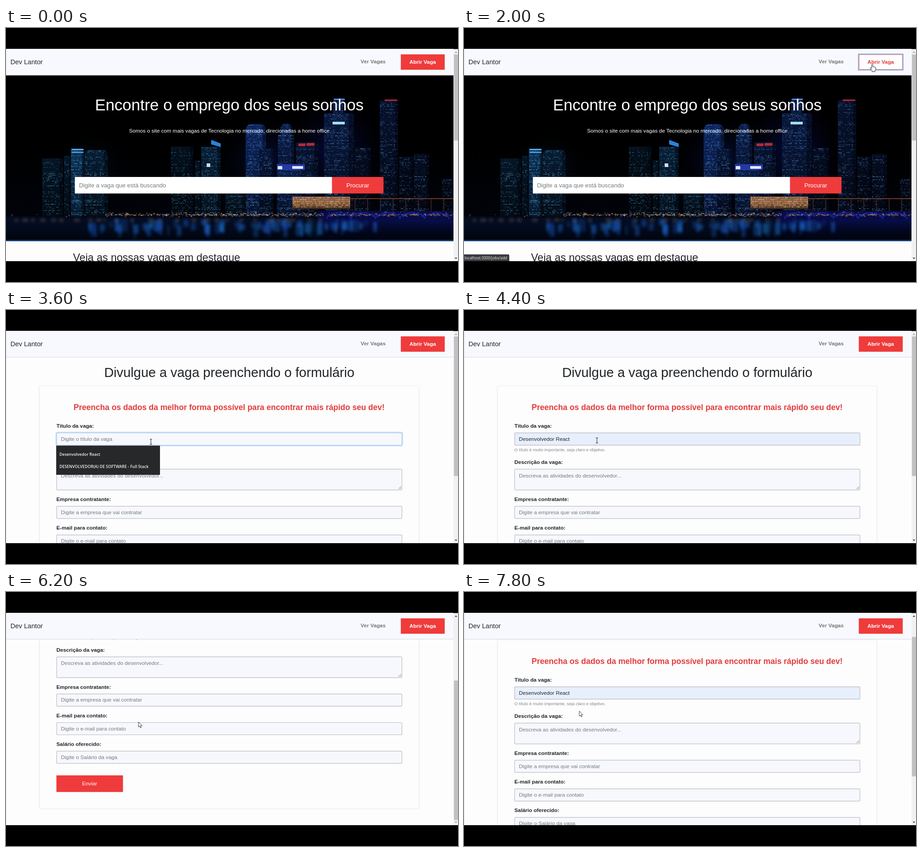
Recreate the animation shown at these times as an HTML page with a canvas. Size 998x561 px, loop 8000 ms.

```html
<!DOCTYPE html>
<html lang="pt-BR">
<head>
<meta charset="utf-8">
<title>Vagas</title>
<style>
  @property --scroll { syntax: "<number>"; inherits: true; initial-value: 0; }
  html, body { margin: 0; width: 100%; height: 100%; overflow: hidden; background: #000; }
  canvas, svg { position: absolute; left: 0; top: 0; }
  canvas { top: 104px; }
  svg { font: 11.73px "Liberation Sans", Arial, sans-serif; fill: #212529; }

  .brand { font-size: 14.61px; }
  .h1 { font-size: 35.22px; }
  .h2 { font-size: 29.34px; }
  .h3 { font-size: 23.46px; }
  .lead { font-size: 17.58px; fill: #e23d3d; }
  .big { font-size: 13.2px; }
  .small { font-size: 9.38px; fill: #80868c; }
  .bold { font-weight: 700; }
  .mid { text-anchor: middle; }
  .hint { fill: #757a80; }
  .white { fill: #fff; }
  .red { fill: #ef3b3b; }
  .ui { font-family: "Open Sans", "Noto Sans", sans-serif; font-size: 8.4px; fill: #f2f2f2; }
  .menu { font-size: 8.9px; font-weight: 600; }
  .box { fill: #f7f8fd; stroke: #c3c5cb; stroke-width: 1.4; }
  .halo { fill: none; stroke: #bfd9f8; stroke-width: 3; }

  .anim { animation: 8s step-end infinite; }
  .home { animation-name: home; }
  .form { animation-name: form; }
  .hover { animation-name: hover; }
  .status { animation-name: status; }
  .ring { animation-name: ring; }
  .focus { animation-name: focus; }
  .drop { animation-name: drop; }
  .pick { animation-name: pick; }
  .filled { animation-name: filled; }
  .hand { animation-name: hover; }
  .beam { animation-name: beam; }
  .arrow { animation-name: arrow; }
  .up { animation-name: up; }
  .down { animation-name: down; }
  .cursor { animation-name: cursor; }
  .stage { animation-name: scroll; }
  .page { transform: translateY(calc(var(--scroll) * -1px)); }
  .thumb { transform: translateY(calc(var(--scroll) * .6577px)); }

  @keyframes home { 0% { opacity: 1 } 27.5% { opacity: 0 } }
  @keyframes form { 0% { opacity: 0 } 27.5% { opacity: 1 } }
  @keyframes hover { 0%, 32.5% { opacity: 0 } 12.5% { opacity: 1 } }
  @keyframes status { 0%, 32.5% { opacity: 0 } 15% { opacity: 1 } }
  @keyframes ring { 0%, 27.5% { opacity: 0 } 22.5% { opacity: 1 } }
  @keyframes focus { 0%, 55% { opacity: 0 } 42.5% { opacity: 1 } }
  @keyframes drop { 0%, 52.5% { opacity: 0 } 45% { opacity: 1 } }
  @keyframes pick { 0%, 52.5% { opacity: 0 } 50% { opacity: 1 } }
  @keyframes filled { 0% { opacity: 0 } 50% { opacity: 1 } }
  @keyframes beam {
    0%, 47.5%, 62.5%, 77.5% { opacity: 0 }
    40%, 52.5%, 70% { opacity: 1 }
  }
  @keyframes arrow {
    0%, 12.5%, 40%, 52.5%, 70% { opacity: 0 }
    2.5%, 32.5%, 47.5%, 62.5%, 77.5% { opacity: 1 }
  }
  @keyframes up {
    0%, 70% { fill: #a8a8a8 }
    62.5%, 77.5% { fill: #505050 }
  }
  @keyframes down {
    0%, 67.5%, 85% { fill: #505050 }
    65%, 77.5% { fill: #a8a8a8 }
  }
  @keyframes scroll {
    0%, 70% { --scroll: 0 }
    62.5% { --scroll: 104 }
    65%, 77.5% { --scroll: 208.3 }
    67.5% { --scroll: 90 }
    85% { --scroll: 172 }
    87.5% { --scroll: 135 }
    90% { --scroll: 98 }
    92.5% { --scroll: 62 }
  }
  @keyframes cursor {
    0% { transform: translate(985px, 330px) }
    5% { transform: translate(962px, 265px) }
    7.5% { transform: translate(938px, 195px) }
    10% { transform: translate(916px, 130px) }
    12.5% { transform: translate(905px, 88px) }
    15% { transform: translate(903px, 83px) }
    17.5% { transform: translate(902px, 81px) }
    20% { transform: translate(901.5px, 80px) }
    27.5% { transform: translate(901px, 80.5px) }
    30% { transform: translate(895px, 87px) }
    32.5% { transform: translate(800px, 130px) }
    35% { transform: translate(650px, 190px) }
    37.5% { transform: translate(500px, 245px) }
    40% { transform: translate(390px, 281px) }
    42.5% { transform: translate(335px, 289px) }
    45% { transform: translate(320px, 291px) }
    47.5% { transform: translate(308px, 306px) }
    50% { transform: translate(296px, 318px) }
    52.5% { transform: translate(294px, 297px) }
    55% { transform: translate(293.5px, 288px) }
    77.5% { transform: translate(292.5px, 287px) }
    87.5% { transform: translate(286px, 283px) }
    90% { transform: translate(277px, 277px) }
    92.5% { transform: translate(268px, 271px) }
    95% { transform: translate(260px, 266px) }
    97.5% { transform: translate(254.5px, 263px) }
  }
</style>
</head>
<body>
<canvas class="anim home" width="988" height="367"></canvas>
<svg class="anim stage" width="998" height="561" viewBox="0 0 998 561">
  <defs>
    <clipPath id="view"><rect y="46.4" width="998" height="468.6"/></clipPath>
    <filter id="soft" x="-5%" y="-5%" width="110%" height="110%"><feGaussianBlur stdDeviation="1.6"/></filter>
  </defs>
  <g clip-path="url(#view)">

    <g class="anim home">
      <rect y="471" width="988" height="45" fill="#fdfdfe"/>
      <text class="h1 mid white" x="493" y="182.3">Encontre o emprego dos seus sonhos</text>
      <text class="mid white" x="493" y="231.3">Somos o site com mais vagas de Tecnologia no mercado, direcionadas a home office</text>
      <rect class="white" x="152" y="329" width="568" height="36.5"/>
      <text class="big hint" x="161.3" y="351.7">Digite a vaga que está buscando</text>
      <rect class="red" x="719.7" y="329" width="113.8" height="36.5"/>
      <text class="big mid white" x="776.7" y="351.7">Procurar</text>
      <text class="h3" x="148" y="515.3">Veja as nossas vagas em destaque</text>
    </g>

    <g class="anim form">
      <rect y="46" width="988" height="470" fill="#fdfdfd"/>
      <rect y="46" width="1" height="470" fill="#e6e6ef"/>
      <g class="page">
        <text class="h2 mid" x="493" y="148">Divulgue a vaga preenchendo o formulário</text>
        <rect x="74" y="168.5" width="838" height="518.5" rx="2" fill="#dcdde4" filter="url(#soft)"/>
        <rect x="74.5" y="168.5" width="837" height="518" rx="2" fill="#fdfdfd"/>
        <text class="lead bold mid" x="492.6" y="221.2">Preencha os dados da melhor forma possível para encontrar mais rápido seu dev!</text>

        <text class="bold" x="111.5" y="260">Titulo da vaga:</text>
        <rect class="box" x="111.8" y="271.5" width="762.4" height="27" rx="2"/>
        <text class="hint" x="121.3" y="288.8">Digite o título da vaga</text>
        <g class="anim filled">
          <rect class="box" x="111.8" y="271.5" width="762.4" height="27" rx="2" style="fill:#e7effd"/>
          <text x="121.3" y="288.8">Desenvolvedor React</text>
        </g>
        <rect class="halo anim focus" x="111" y="270.5" width="764" height="29" rx="3"/>
        <text class="small" x="111.3" y="312">O título é muito importante, seja claro e objetivo.</text>

        <text class="bold" x="111.3" y="340">Descrição da vaga:</text>
        <rect class="box" x="111.8" y="351.5" width="762.4" height="46" rx="2"/>
        <path d="M866.5 395.5l6-6M870 395.5l2.5-2.5" fill="none" stroke="#777"/>
        <text class="hint" x="121.3" y="369.5">Descreva as atividades do desenvolvedor...</text>

        <text class="bold" x="111.3" y="422">Empresa contratante:</text>
        <rect class="box" x="111.8" y="433.5" width="762.4" height="27" rx="2"/>
        <text class="hint" x="121.3" y="450.8">Digite a empresa que vai contratar</text>

        <text class="bold" x="111.3" y="485">E-mail para contato:</text>
        <rect class="box" x="111.8" y="496.7" width="762.4" height="27" rx="2"/>
        <text class="hint" x="121.3" y="514">Digite o e-mail para contato</text>

        <text class="bold" x="111.3" y="548.3">Salário oferecido:</text>
        <rect class="box" x="111.8" y="559.8" width="762.4" height="27" rx="2"/>
        <text class="hint" x="121.3" y="577">Digite o Salário da vaga</text>

        <rect class="red" x="111.3" y="613.3" width="147" height="36.7"/>
        <text class="mid white" x="184.6" y="635.6">Enviar</text>
      </g>
      <g class="anim drop">
        <rect x="110.8" y="299.5" width="229.2" height="64.5" rx="1" fill="#27282a"/>
        <rect class="anim pick" x="111" y="306" width="229" height="26" fill="#424447"/>
        <text class="ui menu" x="118" y="322">Desenvolvedor React</text>
        <text class="ui menu" x="118" y="348.7">DESENVOLVEDOR(A) DE SOFTWARE - Full Stack</text>
      </g>
    </g>

    <rect y="46" width="988" height="58.6" fill="#f8f9fe"/>
    <rect y="46" width="1" height="58" fill="#e2e2ec"/>
    <rect class="anim form" y="103.7" width="988" height="1" fill="#d5d6e2"/>
    <text class="brand" x="9.7" y="80.2">Dev Lantor</text>
    <text class="bold" x="783" y="78.2" style="fill:#777">Ver Vagas</text>
    <rect class="red" x="871.7" y="58.2" width="97" height="34"/>
    <text class="bold mid white" x="920" y="78.8">Abrir Vaga</text>
    <g class="anim hover">
      <rect class="anim ring" x="869.7" y="56.2" width="101" height="38" rx="1" fill="#9cc3f3"/>
      <rect x="872.2" y="58.7" width="96" height="33" fill="#fdfdfe" stroke="#d9534f"/>
      <text class="bold mid" x="920" y="78.8" style="fill:#e23d3d">Abrir Vaga</text>
    </g>

    <rect x="988" y="46" width="10" height="470" fill="#f1f1f4"/>
    <rect class="anim home" x="989" y="58.5" width="9" height="190" fill="#c1c1c3"/>
    <g class="anim form"><rect class="thumb" x="989" y="58.5" width="9" height="308" fill="#c1c1c3"/></g>
    <path class="anim up" d="M990.5 55l3-3.5 3 3.5z"/>
    <path class="anim down" d="M990.5 507l3 3.5 3-3.5z"/>

    <g class="anim status">
      <path d="M0 500h97q3 0 3 3v13H0z" fill="#3a3b3e"/>
      <text class="ui" x="1.3" y="510.8">localhost:3000/jobs/add</text>
    </g>

    <g class="anim cursor" stroke-linejoin="round">
      <path class="anim arrow" d="M0 0v11.2l2.6-2.4 1.8 4.2 1.8-.8-1.8-4H8z" fill="#fff" stroke="#222" stroke-width=".9"/>
      <path class="anim beam" d="M-2.5-6Q0-6 0-4.5Q0-6 2.5-6M0-5V5M-2.5 6Q0 6 0 4.5Q0 6 2.5 6" fill="none" stroke="#222" stroke-width="1.1"/>
      <path class="anim hand" d="M-1.4 1q1.4-2 2.8 0v5q1.3-1 2.4.3 1.4-.7 2.2.5 1.6-.4 1.6 1.4v3.2l-1.6 3v2h-6.4v-2l-4-5.4q-.2-2 1.7-1.4l1.3 1.5z" fill="#fff" stroke="#222" stroke-width="1"/>
    </g>
  </g>
</svg>
<script>
const ctx = document.querySelector("canvas").getContext("2d");
let seed = 77;
const rnd = () => (seed = seed * 16807 % 2147483647) / 2147483647;
const between = (a, b) => a + rnd() * (b - a);
const box = (color, x, y, w, h) => { ctx.fillStyle = color; ctx.fillRect(x, y, w, h); };
const fade = (y0, y1, ...colors) => {
  const g = ctx.createLinearGradient(0, y0, 0, y1);
  colors.forEach((c, i) => g.addColorStop(i / (colors.length - 1), c));
  return g;
};
const glow = (x, y, r, color) => {
  const g = ctx.createRadialGradient(x, y, 0, x, y, r);
  g.addColorStop(0, color);
  g.addColorStop(1, "transparent");
  box(g, x - r, y - r, 2 * r, 2 * r);
};

ctx.translate(0, -104);
box(fade(104, 420, "#000", "#000", "#01030a"), 0, 104, 988, 367);
glow(570, 290, 110, "rgba(8,30,120,.45)");
glow(725, 270, 130, "rgba(10,20,130,.5)");
glow(185, 310, 90, "rgba(6,30,70,.4)");

// left, top, width, brightness, roof radius
const towers = [
  [80, 288, 46, .35, 0], [128, 282, 14, .35, 0], [143, 266, 29, .8, 0], [173, 269, 52, .45, 12],
  [364, 262, 50, .25, 0], [417, 292, 13, .3, 0], [431, 262, 43, .5, 0],
  [606, 211, 26, .7, 12], [600, 235, 36, .6, 4], [640, 252, 49, .45, 4], [529, 212, 45, .85, 14],
  [559, 266, 32, .5, 3], [598, 300, 64, .7, 0], [722, 156, 26, .6, 0], [702, 188, 66, .55, 5],
  [769, 264, 36, .3, 0], [825, 160, 41, .4, 0], [868, 284, 30, .25, 0], [900, 278, 34, .3, 0],
  [962, 333, 26, .2, 0], [484, 366, 46, .35, 0]
];
for (const [x, y, w, lit, round] of towers) {
  const hue = x > 500 ? 222 : 210;
  ctx.save();
  ctx.beginPath();
  ctx.roundRect(x, y, w, 416 - y, [round, round, 0, 0]);
  ctx.clip();
  box(fade(y, 416, `hsl(${hue},75%,${lit * 24}%)`, `hsl(${hue},75%,${lit * 12}%)`), x, y, w, 416 - y);
  for (let fy = y + 2; fy < 413; fy += 3.4) {
    const floor = rnd() * .6 + lit * .45;
    for (let fx = x + 1; fx < x + w - 1; fx += 3)
      if (rnd() < floor * .8)
        box(`hsla(${hue - 8},75%,${between(45, 78)}%,${floor * between(.3, 1)})`, fx, fy, 2.6, 1.5);
  }
  box("rgba(0,2,10,.45)", x + w - w / 6, y, w / 6, 416 - y);
  ctx.restore();
}

// lit roofs and signs
ctx.fillStyle = "#2c82d8";
ctx.beginPath();
ctx.moveTo(453, 247);
ctx.lineTo(474, 255);
ctx.lineTo(474, 263);
ctx.lineTo(453, 257);
ctx.fill();
box("#5ba9df", 145, 267, 26, 3);
box("#4c9bd8", 145, 273, 26, 3);
box("#a4dcee", 721, 207, 27, 6);
box("#4f8fe0", 724, 156, 24, 3);
box("#b52a36", 646, 255, 15, 6);
box("#b52a36", 664, 254, 17, 6);
box("#b52a36", 836, 158, 28, 3);
box("#cfdcff", 443, 299, 8, 8);
box("#2438a8", 598, 301, 62, 12);
box("#dfe8ff", 600, 305, 10, 7);
box("#dfe8ff", 632, 305, 24, 6);

// waterfront
box(fade(368, 400, "#6a4a48", "#8a5a34", "#3a2418"), 632, 372, 128, 28);
for (let y = 374; y < 398; y += 4)
  for (let x = 634; x < 758; x += 3) box(`rgba(255,215,170,${between(.1, .9)})`, x, y, 2, 2.2);
box("#8a4a2a", 750, 376, 238, 1.6);
for (let x = 770; x < 988; x += 28) box("#5b3230", x, 376, 1.2, 28);
box("#04081a", 0, 416, 988, 8);
box("#070c45", 690, 404, 298, 22);
for (let i = 0; i < 800; i++) {
  const x = between(i < 60 ? 0 : 220, 988), warm = rnd() < .7;
  box(`hsla(${warm ? 26 : 212},75%,${between(45, 85)}%,${between(.15, .8)})`, x, 412 + between(-7, 5) * rnd(), between(1, 4), 1.6);
}
box(fade(420, 470, "#040d22", "#030a1c", "#01040c"), 0, 420, 690, 48);
box(fade(424, 470, "#080e48", "#030720", "#01030c"), 690, 424, 298, 44);
ctx.filter = "blur(3px)";
for (let i = 0; i < 90; i++) {
  const x = i < 45 ? between(170, 480) : between(500, 820);
  box(`hsla(${between(208, 220)},75%,50%,${between(.1, .55)})`, x, between(421, 436), between(4, 12), between(12, 32));
}
for (let x = 20; x < 690; x += between(14, 40))
  box("rgba(190,140,110,.28)", x, 421, between(4, 14), 7);
ctx.filter = "none";
ctx.lineWidth = 2.5;
ctx.strokeStyle = "#151f9a";
for (let x = 735; x < 988; x += 54) {
  ctx.beginPath();
  ctx.ellipse(x, 422, 27, 14, 0, Math.PI, 0);
  ctx.stroke();
}
box("#163f78", 0, 468, 988, 3);
</script>
</body>
</html>
```
